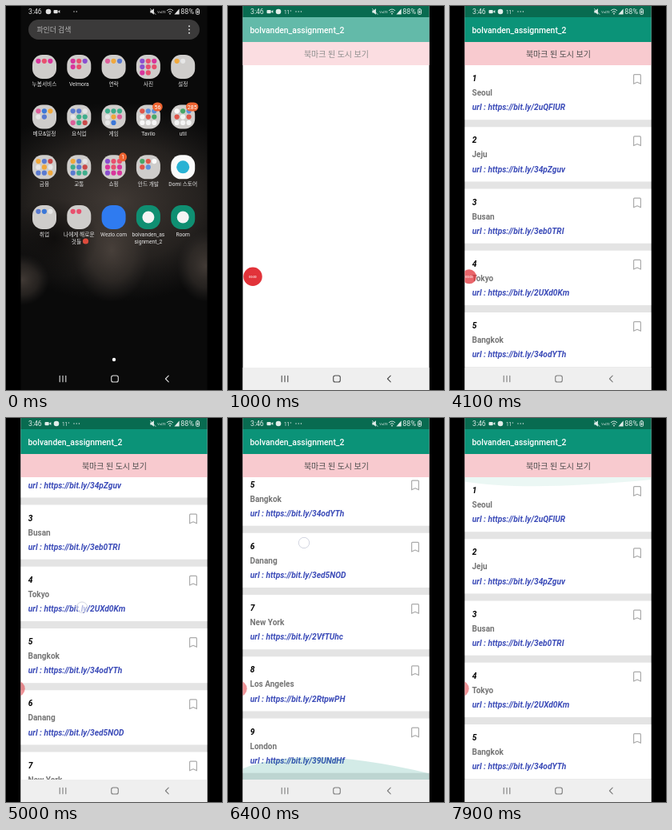
Write an HTML page that moves like this. It is 270 px wide and 480 px high and loops after 8 s.

```html
<!DOCTYPE html>
<html lang="ko">
<head>
<meta charset="utf-8">
<title>City list</title>
<style>
html, body { margin: 0; width: 100%; height: 100%; overflow: hidden; background: #000; }
svg { display: block; width: 270px; height: 480px; }
text { font-family: Roboto, 'Noto Sans CJK KR', 'Noto Sans CJK', sans-serif; }
.mid { text-anchor: middle; }
.line { fill: none; stroke-linecap: round; stroke-linejoin: round; }
</style>
</head>
<body>
<svg viewBox="0 0 270 480">
  <defs>
    <clipPath id="phone"><rect x="18.5" width="233" height="480"/></clipPath>
    <clipPath id="view"><rect x="18.5" y="74" width="233" height="378"/></clipPath>
    <radialGradient id="haze">
      <stop offset="0" stop-color="#4f4640" stop-opacity=".8"/>
      <stop offset=".6" stop-color="#403934" stop-opacity=".5"/>
      <stop offset="1" stop-color="#332f2d" stop-opacity="0"/>
    </radialGradient>
    <radialGradient id="shade">
      <stop offset="0" stop-color="#000" stop-opacity=".6"/>
      <stop offset="1" stop-color="#000" stop-opacity="0"/>
    </radialGradient>
  </defs>
  <g clip-path="url(#phone)">
    <g id="home"></g>
    <g id="app"></g>
    <g id="rec">
      <circle id="disc" fill="#e2333a"/>
      <text id="clock" class="mid" fill="#fff" fill-opacity=".85" font-size="3.6" font-weight="700"></text>
    </g>
    <circle id="touch" cx="95" r="6.7" fill="#fff" fill-opacity=".6" stroke="#c6cad8" stroke-width=".8"/>
  </g>
</svg>
<script>
const $ = id => document.getElementById(id);
const set = (id, attrs) => { for (const k in attrs) $(id).setAttribute(k, attrs[k]); };

const rect = (x, y, w, h, fill, r = 0, more = '') =>
  `<rect x="${x}" y="${y}" width="${w}" height="${h}" rx="${r}" fill="${fill}" ${more}/>`;
const oval = (x, y, rx, ry, fill) => `<ellipse cx="${x}" cy="${y}" rx="${rx}" ry="${ry}" fill="${fill}"/>`;
const disc = (x, y, r, fill) => oval(x, y, r, r, fill);
const label = (x, y, size, fill, str, more = '') =>
  `<text x="${x}" y="${y}" font-size="${size}" fill="${fill}" ${more}>${str}</text>`;
const line = (d, color, width) =>
  `<path class="line" d="${d}" stroke="${color}" stroke-width="${width}"/>`;

// Status and navigation bars
const video = x => rect(x, 4.9, 5.2, 4.4, '#fff', 1) + `<path d="M${x + 5.4} 7l2.4-1.9v3.8z" fill="#fff"/>`;
const chat = x => disc(x, 7, 3.3, '#fff');
const dots = (x, n) => Array.from({ length: n }, (_, i) => disc(x + i * 3.2, 7, .7, '#fff')).join('');
const statusRight =
  '<path d="M180.3 5.5h1.8l2.8-2.2v7.4l-2.8-2.2h-1.8z" fill="#fff"/>' + line('M180.5 3.5l6.5 7', '#fff', .8) +
  label(189.3, 8.8, 3.8, '#fff', 'VoLTE') +
  line('M201.3 5.6q3.7-3.4 7.4 0M202.9 7.5q2.1-2 4.2 0', '#fff', .9) + disc(205, 9.6, .9, '#fff') +
  '<path d="M216.6 3.6v7h-6.2z" fill="#fff"/>' +
  label(218.3, 10.4, 9, '#fff', '88%') +
  rect(237.6, 4, 3.9, 6.4, 'none', 1, 'stroke="#fff" stroke-width=".9"') +
  rect(238.7, 2.9, 1.7, 1, '#fff') + rect(238.8, 5.6, 1.5, 3.4, '#fff');
const status = left => `<g opacity=".88">${label(28, 10.4, 8.7, '#fff', '3:46') + left + statusRight}</g>`;
const nav = color =>
  line('M67.2 462.3v7.4M71 462.3v7.4M74.8 462.3v7.4', color, 1.1) +
  line('M134 462h4q2.3 0 2.3 2.3v3.4q0 2.3-2.3 2.3h-4q-2.3 0-2.3-2.3v-3.4q0-2.3 2.3-2.3z', color, 1.1) +
  line('M203.2 462.2l-3.8 3.8l3.8 3.8', color, 1.1);

// Home screen
const cols = [48, 91.3, 134.6, 177.9, 221.2];
const rows = [76, 138.5, 201.3, 264];
const warm = ['#d8359c', '#8a4fd0', '#e8506e'];
const mixed = ['#3c78d8', '#c94a4a', '#3fae8c', '#f0a83c', '#5a7ad0', '#dd5f9a', '#e6e6e6'];
const pale = ['#f7f7f7', '#e0564a', '#f4f4f4', '#5c8fdc', '#fafafa', '#e9bc4c', '#48a868'];
// [label, small icon count, palette, badge]
const folders = [
  [['누봄서비스', 3, warm], ['Velmora', 5, warm], ['연락', 3, mixed], ['사진', 8, warm], ['설정', 2, mixed]],
  [['메모&amp;일정', 5, mixed], ['요식업', 9, mixed], ['게임', 8, mixed], ['Tavilo', 9, pale, 56], ['util', 9, pale, 285]],
  [['금융', 9, mixed], ['교통', 9, mixed], ['쇼핑', 9, warm, 1], ['안드 개발', 5, pale]],
  [['취업', 3, mixed], ['나에게 해로운', 2, warm]]
];
let seed = 7;
const rnd = () => (seed = seed * 16807 % 2147483647) / 2147483647;
const tile = (x, y, fill) => rect(x - 15, y - 15, 30, 30, fill, 12.5);
const caption = (x, y, str) => label(x, y, 6.7, '#e6e6e6', str, 'class="mid"');

function folder([name, count, palette, badge], x, y) {
  let s = tile(x, y, '#cfcdcb');
  for (let i = 0; i < count; i++) {
    const color = palette[Math.floor(rnd() * palette.length)];
    s += disc(x - 7.6 + i % 3 * 7.5, y - 7.2 + Math.floor(i / 3) * 7.3, 3.1, color);
  }
  if (badge) {
    const w = 7 + String(badge).length * 2.8, bx = x + 11.5;
    s += rect(bx - w / 2, y - 18, w, 11, '#ed6330', 5.5) + label(bx, y - 10, 7, '#fff', badge, 'class="mid"');
  }
  return s + caption(x, y + 23.5, name);
}

$('home').innerHTML =
  rect(18, 0, 234, 480, '#0a0a0a') +
  oval(138, 245, 175, 125, 'url(#haze)') +
  oval(132, 305, 48, 65, 'url(#haze)') +
  oval(20, 342, 34, 32, 'url(#haze)') + oval(250, 325, 36, 45, 'url(#haze)') +
  oval(60, 290, 55, 50, 'url(#shade)') +
  `<g id="early">${status(chat(53) + video(59.5) + dots(85, 2))}</g>` +
  `<g id="late">${status(video(48.5) + chat(63) + label(70, 9.5, 6.4, '#fff', '11°') + dots(85, 3))}</g>` +
  rect(28, 17, 214, 25, '#3b3a3a', 12.5) +
  label(38.4, 32.8, 8.9, '#b3b3b3', '파인더 검색') +
  [25.3, 29.5, 33.7].map(y => disc(229, y, 1, '#ddd')).join('') +
  folders.map((row, r) => row.map((f, c) => folder(f, cols[c], rows[r])).join('')).join('') +
  caption(88, 296.7, '것들') + disc(99.5, 294, 3.6, '#dd4b3c') +
  tile(cols[4], rows[2], '#fafafa') + disc(cols[4], rows[2], 8, '#28b2d4') + caption(cols[4], 224.8, 'Domi 스토어') +
  tile(cols[2], rows[3], '#2f7bf0') + caption(cols[2], 287.5, 'Wezlo.com') +
  `<g id="launch">${tile(cols[3], rows[3], '#0f8f72') + disc(cols[3], rows[3], 7.5, '#f4f4f4')}</g>` +
  caption(cols[3], 287.5, 'bolvanden_as') + caption(cols[3], 296.7, 'signment_2') +
  tile(cols[4], rows[3], '#0f8f72') + disc(cols[4], rows[3], 7.5, '#f4f4f4') + caption(cols[4], 287.5, 'Room') +
  disc(135, 442, 2.2, '#fff') + nav('#ddd');

// City list
const cities = [
  ['Seoul', '2uQFIUR'], ['Jeju', '34pZguv'], ['Busan', '3eb0TRI'],
  ['Tokyo', '2UXd0Km'], ['Bangkok', '34odYTh'], ['Danang', '3ed5NOD'],
  ['New York', '2VfTUhc'], ['Los Angeles', '2RtpwPH'], ['London', '39UNdHf']
];
const pitch = 77.25;
const card = ([city, path], i) => `<g transform="translate(0 ${74 + i * pitch})">` +
  rect(18, 0, 234, 68.2, '#fff') +
  label(27.8, 20, 10.2, '#000', i + 1, 'font-weight="700" font-style="italic"') +
  label(27.5, 38.1, 10, '#757575', city, 'font-weight="700"') +
  label(27.8, 56.3, 10.2, '#3b4bb8', 'url : https://bit.ly/' + path, 'font-weight="700" font-style="italic"') +
  line('M230.6 11.7h6.8q1 0 1 1v10.6l-4.4-2l-4.4 2v-10.6q0-1 1-1z', '#ababab', 1.2) + '</g>';

$('app').innerHTML =
  rect(18, 0, 234, 480, '#fff') +
  `<g clip-path="url(#view)"><g id="list">${rect(18, 74, 234, 378, '#e4e4e4')}` +
  `<g id="cards">${cities.map(card).join('')}</g></g>` +
  '<path id="low" fill="#0b9378" fill-opacity=".18"/><path id="high" fill="#0b9378" fill-opacity=".08"/></g>' +
  rect(18, 14, 234, 31, '#0b9378') + rect(18, 45, 234, 29, '#f8cacf') +
  label(135.4, 63.5, 10, '#4c4c4c', '북마크 된 도시 보기', 'class="mid"') +
  rect(18, 14, 234, 60, '#fff', 0, 'id="veil"') +
  rect(18, 0, 234, 14, '#086b50') +
  status(video(48.5) + chat(63) + label(70, 9.5, 6.4, '#fff', '11°') + dots(85, 3)) +
  label(27.5, 33.8, 10.4, '#fff', 'bolvanden_assignment_2', 'font-weight="500"') +
  rect(18, 452, 234, 28, '#efefef') + `<g id="keys">${nav('#4c4c4c')}</g>`;

// Motion: [time, value] steps joined by straight lines
const scroll = [[4500, 0], [4600, 8], [4800, 55], [5000, 120], [5200, 185], [5400, 229], [5500, 239.75],
  [5700, 244], [6200, 316.5], [6600, 316.5], [6700, 316], [7100, 243], [7200, 220], [7400, 140], [7600, 55], [7800, 0]];
const finger = [[4600, 350], [5200, 180], [5700, 290], [6200, 190], [6400, 156], [6700, 206], [7100, 279], [7200, 302]];
const lowGlow = [[6100, 0], [6400, 30], [6700, 0]];
const highGlow = [[7700, 0], [7900, 12]];
const veil = [[1000, .36], [1400, 0]];
const fade = [[2200, 0], [2300, .5], [2600, .9], [3000, 1]];
const zoom = [[800, .3], [900, .75], [1000, 1]];

function at(steps, t) {
  if (t <= steps[0][0]) return steps[0][1];
  for (let i = 1; i < steps.length; i++) {
    const [t0, a] = steps[i - 1], [t1, b] = steps[i];
    if (t <= t1) return a + (b - a) * (t - t0) / (t1 - t0);
  }
  return steps[steps.length - 1][1];
}
const within = (t, a, b) => t >= a && t <= b;
const show = (id, on) => { $(id).style.display = on ? '' : 'none'; };
// Overscroll glow, leaning towards the finger
const arc = (edge, h) => `M18 ${edge}V${edge - h * .45}Q95 ${edge - h * 1.5} 252 ${edge - h * .25}V${edge}z`;

function recorder(t) {
  const [x, r, alpha] = t < 4100 ? [31, 11.7, 1] : t < 4600 ? [24, 9, .75] : [14, 9.7, .52];
  set('disc', { cx: x, cy: 338.3, r, 'fill-opacity': alpha * at([[100, 0], [400, 1]], t) });
  const sec = Math.max(0, Math.floor((t - 300) / 1000));
  $('clock').textContent = '00:0' + sec;
  set('clock', { x, y: 339.6 });
  show('clock', within(t, 300, 4500));
}

function draw(t) {
  show('home', t < 1000);
  show('early', t < 300);
  show('late', t >= 300);
  set('launch', { opacity: within(t, 600, 800) ? .7 : 1 });
  show('app', t >= 900);
  const z = at(zoom, t);
  set('app', {
    transform: `translate(${cols[3] * (1 - z)} ${rows[3] * (1 - z)}) scale(${z})`,
    opacity: t < 1000 ? .8 : 1
  });
  set('veil', { opacity: at(veil, t) });
  set('list', { opacity: at(fade, t) });
  set('keys', { opacity: 1 - .3 * at(fade, t) });
  set('cards', { transform: `translate(0 ${-at(scroll, t)})` });
  set('low', { d: arc(452, at(lowGlow, t)) });
  set('high', { d: arc(74, -at(highGlow, t)) });
  show('touch', within(t, 4600, 5200) || within(t, 5700, 7200));
  set('touch', { cy: at(finger, t) });
  recorder(t);
}

const start = performance.now();
function tick() {
  const t = (performance.now() - start) % 8000;
  draw(Math.floor(t / 100) * 100);
  requestAnimationFrame(tick);
}
tick();
</script>
</body>
</html>
```
